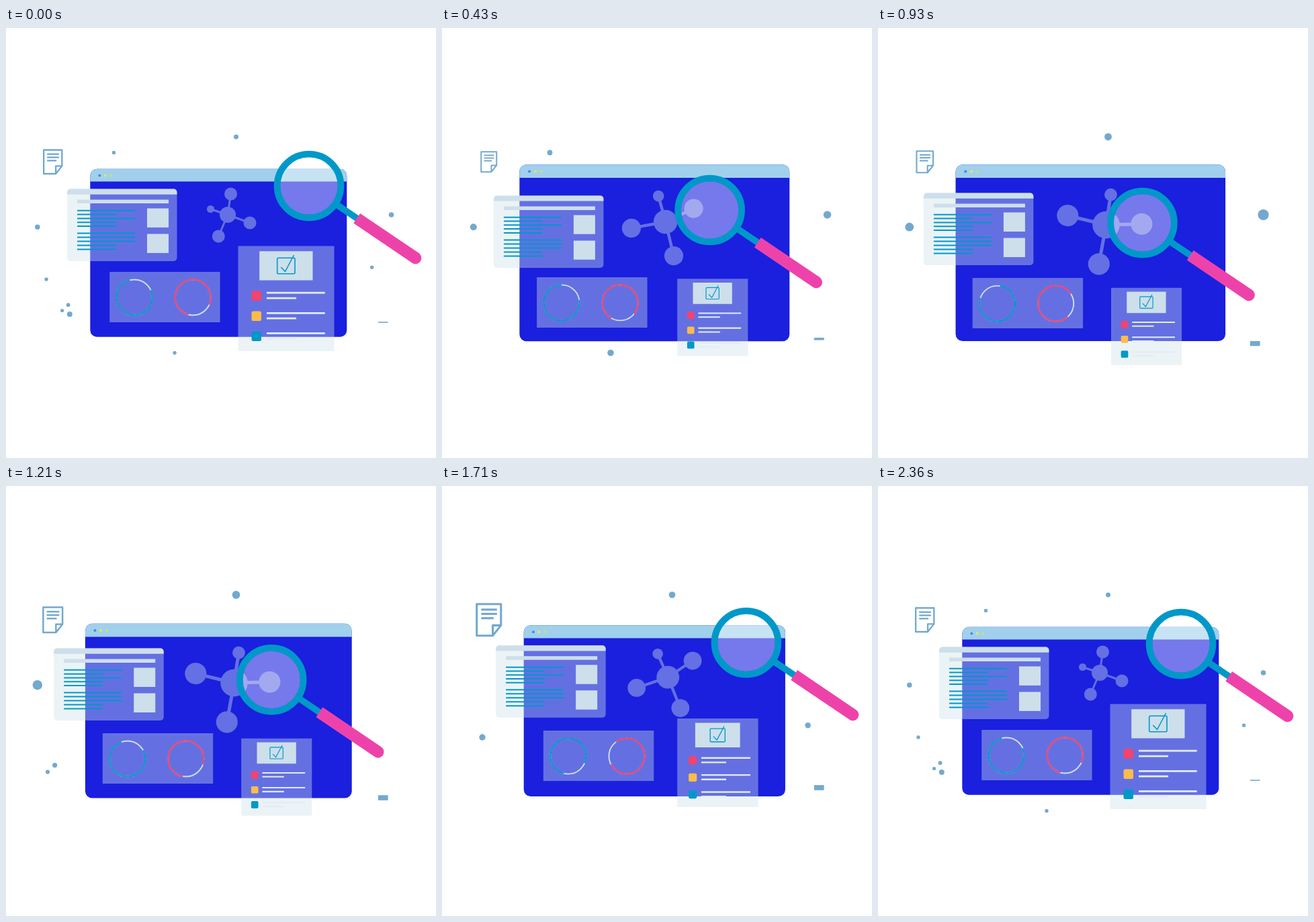
Recreate the animation shown at these times as an HTML page with a canvas. Size 640x640 px, loop 2430 ms.

```html
<!DOCTYPE html>
<html lang="en">
<head>
<meta charset="utf-8">
<title>Research dashboard</title>
<style>
html, body { margin: 0; width: 100%; height: 100%; overflow: hidden; background: #fff; }
canvas { display: block; width: 640px; height: 640px; }
</style>
</head>
<body>
<canvas id="stage" width="640" height="640"></canvas>
<script>
const c = document.getElementById('stage').getContext('2d');
const LOOP = 2430, STEP = 71.47, LAST = 33;
const BLUE = '#1a20dd', SKY = '#a0d0ec', PALE = '#cddfea', TEAL = '#0098c9', RED = '#f4436c',
  AMBER = '#fdbb4a', PINK = '#ee42ab', LILAC = '#6470e3', SOFT = '#73a9ce', LINE = '#e2ecf4',
  GLASS = 'rgba(206,225,233,.41)';

// Easings on 0..1
const linear = v => v;
const smooth = v => (1 - Math.cos(Math.PI * v)) / 2;
const speedUp = p => v => v ** p;
const slowDown = p => v => 1 - (1 - v) ** p;
const settle = v => 1 - (1 - v) ** 2 * (1 + 2 * v - 6 * v * v);

// Goes 0 to 1 over a..b and back over c..d, once per cycle.
function swing(k, a, b, c, d, up = smooth, down = smooth) {
  const t = a + (k - a + LAST) % LAST;
  const part = (from, to) => Math.min(1, Math.max(0, (t - from) / (to - from)));
  return up(part(a, b)) - down(part(c, d));
}

function box(x, y, w, h, color, r = 0) {
  c.fillStyle = color;
  c.beginPath();
  c.roundRect(x, y, w, h, r);
  c.fill();
}
function disc(x, y, r, color) {
  c.fillStyle = color;
  c.beginPath();
  c.arc(x, y, r, 0, 7);
  c.fill();
}
function path(points, color, width) {
  c.strokeStyle = color;
  c.lineWidth = width;
  c.beginPath();
  points.forEach(p => c.lineTo(...p));
  c.stroke();
}
function arc(x, y, r, from, to, color, width) {
  c.strokeStyle = color;
  c.lineWidth = width;
  c.beginPath();
  c.arc(x, y, r, (from - 90) * Math.PI / 180, (to - 90) * Math.PI / 180);
  c.stroke();
}
const row = (x, y, w, color, width) => path([[x, y], [x + w, y]], color, width);
function at(x, y, scale, turn, draw) {
  c.save();
  c.translate(x, y);
  c.scale(scale, scale);
  c.rotate(turn * Math.PI / 180);
  draw();
  c.restore();
}

// x, y, radius, growth per step, end of life, birth, drifting in
const dots = [
  [160.5, 185.5, 2.7, .2, 12, 27],
  [342.5, 162, 3.5, .15, 5, 11],
  [46.8, 296.2, 3.8, .2, 20, 31],
  [573.5, 278, 3.8, .33, 14, 27],
  [60, 374, 2.7, .22, 6, 20],
  [544.6, 356.2, 2.7, .17, 4, 20],
  [251, 483.5, 2.7, .35, 8, 31],
  [92.6, 412.2, 2.9, 0, 4, 27, true],
  [94.8, 426, 4, 0, 4, 27, true],
  [83.6, 420.5, 2.6, 0, 4, 30, true],
  [75.2, 432.4, 4.8, 0, 13, 8],
  [72.6, 415.6, 3.6, 0, 21, 14],
  [62, 425.6, 3.1, 0, 21, 14]
];
function drawDot(k, [x, y, r, growth, end, birth, drifts]) {
  const alive = birth < end ? k >= birth && k < end : k >= birth || k < end;
  if (!alive) return;
  const left = k >= birth ? LAST - k : 0;
  const drift = drifts ? left : 0;
  c.globalAlpha = drifts ? 1 - drift / 6.5 : 1;
  disc(x - 1.35 * drift, y + .875 * drift, r + growth * Math.min(k, LAST - k < k && k >= birth ? left : k), SOFT);
  c.globalAlpha = 1;
}

function drawDoc() {
  c.lineJoin = 'round';
  path([[13.3, 6], [13.3, -17.2], [-13.2, -17.2], [-13.2, 17.3], [4.3, 17.3], [13.3, 6], [4.3, 6], [4.3, 17.3]], SOFT, 2.3);
  for (let i = 0; i < 3; i++) row(-8.3, -11.2 + 4.7 * i, i < 2 ? 17.2 : 13.6, SOFT, 2.3);
}
function drawWindow() {
  box(-191, -125, 382, 250, BLUE, 10);
  box(-191, -125, 382, 18.8, SKY, [10, 10, 0, 0]);
  ['#478fd0', '#f5e04e', '#bfe08a'].forEach((color, i) => disc(-177 + i * 8.6, -115.2, 2, color));
}
function drawText() {
  box(91, 239, 163.5, 107.5, GLASS, 5);
  box(91, 239, 163.5, 8.2, PALE, [5, 5, 0, 0]);
  box(106, 255, 136, 5.5, PALE);
  for (let i = 0; i < 2; i++) box(210, 268 + 38 * i, 32, 28.4, PALE);
  for (let i = 0; i < 5; i++) {
    row(106, 271.3 + 5.8 * i, i % 2 || i > 3 ? 58 : 86, TEAL, 2);
    row(106, 305 + 6 * i, i > 2 ? 58 : 86, TEAL, 2);
  }
}
function drawCharts(turn) {
  box(154.2, 363, 164.4, 75, GLASS);
  for (const [x, gap, color] of [[191.2, -15, TEAL], [278.3, 114, RED]]) {
    arc(x, 401, 26.5, 0, 360, PALE, 1.9);
    arc(x, 401, 26.5, gap + 81 + turn, gap + 360 + turn, color, 2.2);
  }
}
function drawMolecule() {
  const nodes = [[4.5, -31, 9.5], [-25.5, -8.5, 5.6], [33, 12, 9.5], [-13.7, 32, 9.5]];
  for (const [x, y, r] of nodes) {
    path([[0, 0], [x, y]], LILAC, 3);
    disc(x, y, r, LILAC);
  }
  disc(0, 0, 12, LILAC);
}
function drawList() {
  box(0, 0, 143, 156.5, GLASS);
  box(31.7, 7.7, 79.3, 43.2, PALE);
  c.strokeStyle = TEAL;
  c.lineWidth = 1.6;
  c.beginPath();
  c.roundRect(58.2, 17.8, 26.3, 23.4, 1.5);
  c.stroke();
  path([[63.8, 31.5], [70, 38], [83, 13.5]], TEAL, 1.6);
  [RED, AMBER, TEAL].forEach((color, i) => {
    const y = 66.8 + i * 30.1;
    box(20, y, 14.5, 14.5, color, 2.5);
    row(42.5, y + 2.9, 86.7, LINE, 2.8);
    row(42.5, y + 10.8, 44, LINE, 2.8);
  });
}
function drawLens() {
  disc(0, 0, 43, 'rgba(255,255,255,.4)');
  arc(0, 0, 47.4, 0, 360, TEAL, 9.8);
  c.rotate(34.1 * Math.PI / 180);
  row(49, 0, 39, TEAL, 9.6);
  box(86, -8.8, 114.3, 17.6, PINK, [0, 8.8, 8.8, 0]);
}

function render(now) {
  const k = Math.min(LAST, Math.floor((now % LOOP + 8) / STEP));
  const s = (...args) => swing(k, ...args);
  c.clearRect(0, 0, 640, 640);
  dots.forEach(d => drawDot(k, d));

  const barH = 1.6 + 6 * s(0, 15, 24, 33);
  box(553.8, 438 + 33 * s(0, 9, 10, 33) - barH / 2, 14.8, barH, SOFT);

  at(69.7, 199.2, .81 + .55 * s(10, 24, 24, 43, linear, slowDown(1.45)), 0, drawDoc);
  at(316.3, 334.7, 1 + .061 * s(0, 10, 10, 33, slowDown(2.1), slowDown(1.25)), 0, drawWindow);
  at(-24 * s(0, 10.8, 10.8, 30.5, smooth, speedUp(1.5)),
    -2.6 + 14.6 * s(-3.8, 8.7, 8.7, 29.2, smooth, slowDown(2)), 1, 0, drawText);

  const spin = 360 * s(4.5, 16, 16, 29.5);
  at(-14.7 * s(0, 9, 9, 31, slowDown(2)),
    13.2 * s(0, 10, 10, 33, linear, slowDown(2.67)), 1, 0, () => drawCharts(spin));

  const grow = s(0, 9.5, 17, 33);
  at(330 + 9.5 * s(0, 10, 17, 33, speedUp(2.5), speedUp(1.3)), 278 + 15 * s(0, 9.5, 17, 30),
    1 + .69 * grow, 80.4 * grow, drawMolecule);

  const shrink = s(0, 6, 17, 33);
  at(345.5 + 4.7 * s(0, 6, 24, 33) - 5.3 * s(6, 10, 10, 17), 324.5 + 65 * s(0, 9, 10, 33),
    1 - .265 * shrink, 0, drawList);

  at(451 - 57.5 * s(0, 9, 16.3, 28, slowDown(2.2), settle),
    235 + 55 * s(0, 10, 16.3, 28, smooth, settle), 1, 0, drawLens);
  requestAnimationFrame(render);
}
render(0);
</script>
</body>
</html>
```
